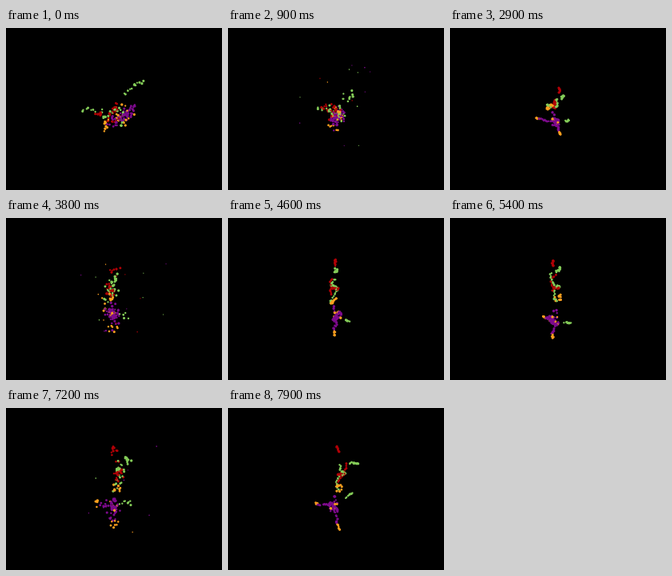
Write a matplotlib script that moves like this. It is 270x203 px and loops after 8 s.

```python
import numpy as np
import matplotlib.pyplot as plt
from matplotlib.animation import FuncAnimation

W, H, DPI = 270, 203, 64
FRAMES, STEP = 80, 100
RED, GREEN, ORANGE, PURPLE = "#b00006", "#84cc58", "#ffa01e", "#7c0a8c"

# Joints of the figure: crown, arm, chest, waist, hip, foot, hand, elbow.
CROWN, ARM, CHEST, WAIST, HIP, FOOT, HAND, ELBOW = range(8)
POSES = [  # key time in steps, looseness, joints
    (0, 1.7, [(115, 109), (170, 65), (127, 101), (143, 115), (152, 106), (122, 119), (95, 102), (123, 127)]),
    (19, 0.6, [(129, 88), (142, 101), (134, 96), (129, 106), (121, 114), (142, 131), (138, 100), (143, 92)]),
    (29, 0.7, [(137, 75), (142, 85), (136, 92), (124, 99), (132, 118), (138, 134), (149, 116), (108, 113)]),
    (46, 0.9, [(134, 52), (136, 64), (133, 74), (132, 104), (136, 123), (133, 147), (151, 129), (138, 117)]),
    (54, 0.9, [(129, 53), (138, 62), (129, 73), (135, 100), (130, 128), (128, 150), (150, 132), (117, 124)]),
    (65, 0.9, [(129, 51), (145, 53), (140, 67), (138, 100), (137, 124), (132, 146), (154, 131), (118, 117)]),
    (79, 0.9, [(136, 49), (162, 69), (144, 69), (139, 100), (132, 124), (139, 152), (154, 107), (109, 119)]),
]

# Limbs: colour, first joint, last joint, covered part of the way, dots, sway.
LIMBS = [
    (PURPLE, HIP, FOOT, 0.0, 0.75, 14, 1.5),
    (PURPLE, HIP, ELBOW, 0.0, 0.85, 14, 1.5),
    (PURPLE, HIP, HIP, 0.0, 1.0, 26, 5.5),
    (PURPLE, WAIST, HIP, 0.5, 1.0, 8, 3.0),
    (RED, CROWN, CHEST, 0.0, 0.35, 9, 0.5),
    (RED, CHEST, WAIST, 0.1, 0.8, 24, 5.0),
    (GREEN, ARM, CHEST, 0.0, 0.5, 13, 0.8),
    (GREEN, CHEST, WAIST, 0.0, 1.0, 26, 4.5),
    (GREEN, HIP, HAND, 0.7, 1.0, 8, 0.5),
    (ORANGE, WAIST, WAIST, 0.0, 1.0, 9, 4.0),
    (ORANGE, HIP, HIP, 0.0, 1.0, 5, 5.0),
    (ORANGE, HIP, FOOT, 0.78, 1.0, 7, 0.3),
    (ORANGE, HIP, ELBOW, 0.87, 1.0, 4, 0.3),
]
ROAM = (84, 46), (204, 156)  # corners of the area loose dots fly through

rng = np.random.default_rng(12)


def limb(joints, loose, first, last, lo, hi, n, sway):
    """A chain of dots from joint to joint, swaying to the sides."""
    t = np.linspace(0, 1, n)[:, None]
    a, b = np.array(joints, float)[[first, last]]
    wave = np.sin(2 * np.pi * (rng.uniform(0.7, 1.7, 2) * t + rng.random(2)))
    pts = a + (b - a) * (lo + (hi - lo) * t) + sway * loose * wave
    return pts + rng.normal(0, 0.7 * loose, pts.shape)


keys = np.array([np.vstack([limb(joints, loose, *spec) for _, *spec in LIMBS])
                 for _, loose, joints in POSES])
times = [p[0] for p in POSES]
tint = np.concatenate([[spec[0]] * spec[5] for spec in LIMBS])
total = len(tint)

order = rng.permutation(total)
keys, tint = keys[:, order], tint[order]
size = rng.uniform(2.2, 3.4, total)
moves = len(POSES) - 1
drift = rng.normal(0, 3, (moves, total, 2))
stray = rng.random((moves, total, 1)) < 0.07
target = rng.uniform(*ROAM, (moves, total, 2))


def state(f):
    k = min(np.searchsorted(times, f, side="right") - 1, moves - 1)
    u = (f - times[k]) / (times[k + 1] - times[k])
    ease = u * u * (3 - 2 * u)
    out = np.sin(np.pi * u)
    pos = keys[k] + (keys[k + 1] - keys[k]) * ease
    pos = pos + out * np.where(stray[k], target[k] - pos, drift[k])
    dia = size * (1 - 0.5 * out * stray[k, :, 0])
    return pos, (dia * 72 / DPI) ** 2


fig = plt.figure(figsize=(W / DPI, H / DPI), dpi=DPI, facecolor="black")
ax = fig.add_axes([0, 0, 1, 1])
ax.set(xlim=(0, W), ylim=(H, 0))
ax.axis("off")
start, area = state(0)
dots = ax.scatter(*start.T, s=area, c=list(tint), linewidths=0)


def draw(f):
    pos, area = state(f)
    dots.set_offsets(pos)
    dots.set_sizes(area)
    return (dots,)


anim = FuncAnimation(fig, draw, frames=FRAMES, interval=STEP, repeat=True, repeat_delay=0)
plt.show()
```
